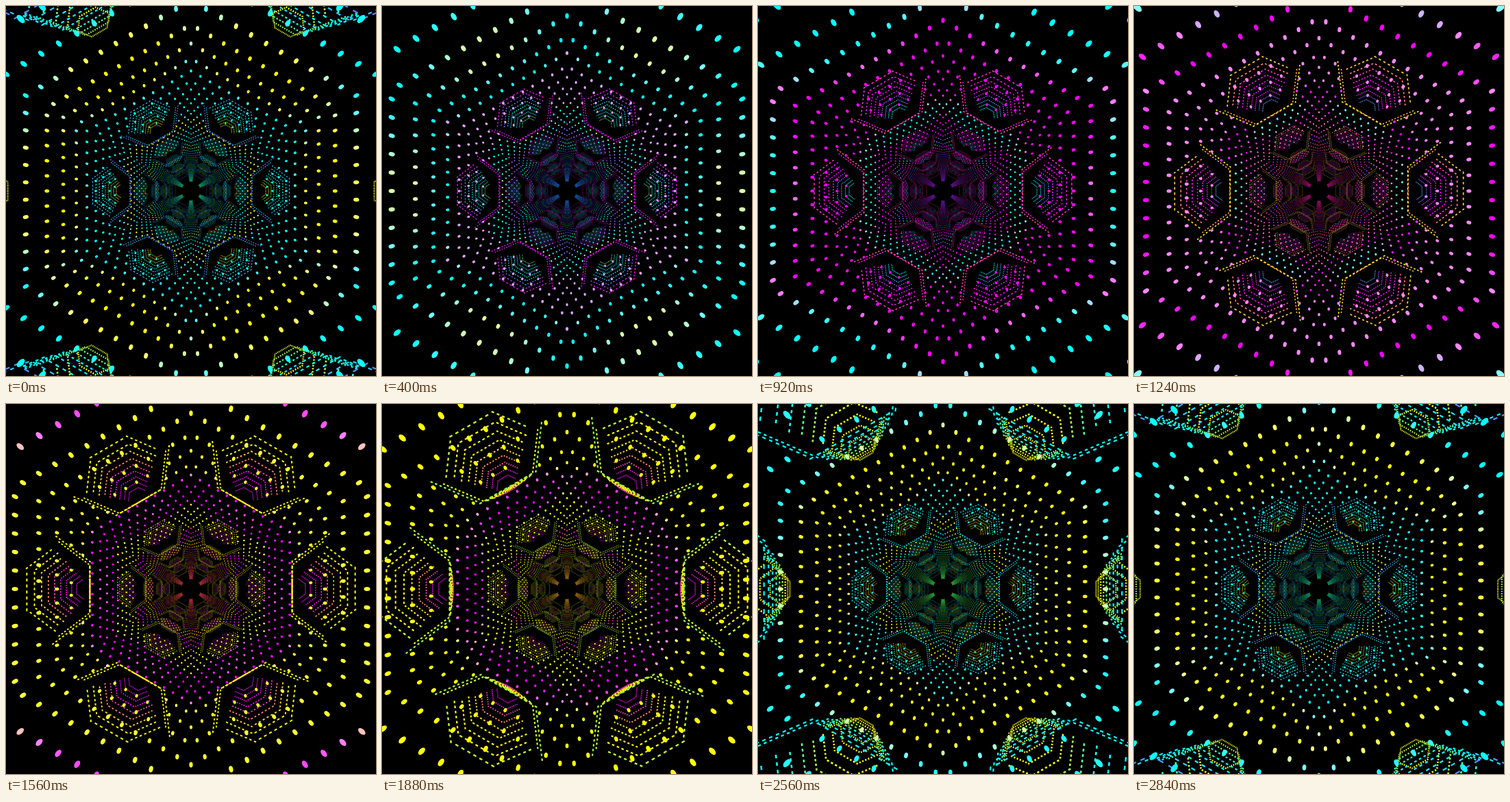
These frames come from a looping animation (540x540 px, 2880 ms). An HTML page with a canvas:

```html
<!DOCTYPE html>
<html lang="en">
<head>
<meta charset="utf-8">
<title>Hexagonal dot tunnel</title>
<style>
  html, body { margin: 0; width: 100%; height: 100%; overflow: hidden; background: #000; }
  canvas { display: block; width: 540px; height: 540px; }
</style>
</head>
<body>
<canvas id="stage" width="540" height="540"></canvas>
<script>
const ctx = document.getElementById('stage').getContext('2d');
const LOOP = 2880, STEP = 40, PERIOD = 10;   // PERIOD: rings between two sets of pods
const SCALE = 1640;                          // wall distance in px at a depth of one ring
const FOCAL = 230, TAU = Math.PI * 2;
const DOTS = 11, HALF_SIDE = 1 / Math.sqrt(3);
const POD = { x: .98, rim: .39, squash: .67, rings: 9 };
const POD_LEFT = POD.x - POD.squash * POD.rim;

const sectors = Array.from({ length: 6 }, (_, i) => [Math.cos(i * TAU / 6), Math.sin(i * TAU / 6)]);

// A high gain bleaches the primaries and keeps yellow, cyan and magenta pure.
function color(hue, gain, alpha = 1) {
  const channel = shift =>
    Math.round(255 * Math.min(1, gain * (1 + Math.cos((hue - shift) * TAU / 360))));
  return `rgba(${channel(0)},${channel(120)},${channel(240)},${alpha})`;
}

const bowlRadius = depth => .3 - .026 * (depth - .1) / .27;

// Half height of the pod mouth at a distance from the axis, both relative to the wall.
const mouth = x => x < POD_LEFT || x > 1 ? 0 : POD.rim / 2 + (x - POD_LEFT) * .747;

function hiddenByPod(n, y, rims) {
  return rims.some(rim => {
    if (rim >= n) return false;
    const ratio = rim / n, depth = n - rim;
    if (Math.abs(y) * ratio >= mouth(ratio)) return false;
    return !(depth < 2.3 && Math.abs(y) < bowlRadius(depth));
  });
}

function drawDot(x, y, r) {
  const rho = Math.hypot(x, y);
  if (r < .75) {
    ctx.fillRect(x - r, y - r, 2 * r, 2 * r);
    return;
  }
  ctx.beginPath();
  ctx.ellipse(x, y, r * Math.hypot(1, rho / FOCAL), r, Math.atan2(y, x), 0, TAU);
  ctx.fill();
}

function drawWall(n, odd, rims, rimHue) {
  const s = SCALE / n, r = Math.max(.5, 19.5 / n);
  const phase = (((n - rims[0]) % PERIOD) + PERIOD) % PERIOD;
  const q = Math.abs(phase - PERIOD / 2) / (PERIOD / 2);
  const gain = Math.max(.5, Math.min(1.5, 22 / n));
  for (let i = 0; i < DOTS; i++) {
    const w = -1 + 2 * (i + (odd ? .5 : 0)) / DOTS, y = w * HALF_SIDE;
    if (hiddenByPod(n, y, rims)) continue;
    const blend = Math.min(1, q * q * 2.6 + w * w * .45);
    ctx.fillStyle = color(rimHue - 175 + 135 * blend, gain, Math.min(1, 25 / n));
    for (const [c, d] of sectors) {
      const px = s * (c - y * d), py = s * (d + y * c);
      if (Math.abs(px) < 280 && Math.abs(py) < 280) drawDot(px, py, r);
    }
  }
}

// Collects dashes along half of a squashed hexagon; side is -1 (inner) or 1 (outer).
function halfRing(side, radius, count, offset, s, visible) {
  const k = side * POD.squash * radius;
  const corners = [[0, -radius], [k, -radius / 2], [k, radius / 2], [0, radius]];
  const dashes = [];
  for (let e = 0; e < 3; e++) {
    const [ax, ay] = corners[e], [bx, by] = corners[e + 1];
    const dx = (bx - ax) / count, dy = (by - ay) / count;
    for (let i = 0; i < count; i++) {
      const f = i + offset;
      const x = (POD.x + ax + dx * f) * s, y = (ay + dy * f) * s;
      if (visible(x, y)) dashes.push([x, y, dx * s * .24, dy * s * .24]);
    }
  }
  return dashes;
}

function strokeDashes(dashes, width, style) {
  ctx.strokeStyle = style;
  ctx.lineWidth = width;
  ctx.beginPath();
  for (const [c, d] of sectors) {
    for (const [x, y, dx, dy] of dashes) {
      const px = x * c - y * d, py = x * d + y * c;
      if (Math.abs(px) > 280 || Math.abs(py) > 280) continue;
      const ex = dx * c - dy * d, ey = dx * d + dy * c;
      ctx.moveTo(px - ex, py - ey);
      ctx.lineTo(px + ex, py + ey);
    }
  }
  ctx.stroke();
}

function drawPod(rim, rimHue) {
  const unit = SCALE / rim;
  const outsideMouth = (x, y) => Math.abs(y) / unit >= mouth(x / unit);
  const always = () => true;
  const alpha = Math.min(1, 22 / rim);
  for (let j = POD.rings - 1; j >= 0; j--) {
    const offset = j % 2 ? .5 : 0;
    const nIn = rim + .28 * j, nOut = rim + .1 + .27 * j;
    const width = Math.max(.7, 16 / nOut);
    const inner = halfRing(-1, POD.rim - .0375 * j, DOTS, offset, SCALE / nIn,
      j < 2 ? always : outsideMouth);
    const outer = halfRing(1, bowlRadius(nOut - rim), 7, offset, SCALE / nOut, always);
    strokeDashes(inner, Math.min(width, 2.2), color(rimHue - 18 * j, .9, alpha));
    strokeDashes(outer, Math.min(width, 2.6), color(rimHue - 10 - 19 * j, .95, alpha));
  }
}

function draw(t) {
  const travel = PERIOD * t, rimHue = 235 + 360 * t;
  const rims = [];
  for (let i = -1; i < 13; i++) {
    const rim = 13.4 + PERIOD * i - travel;
    if (rim > .6) rims.push(rim);
  }
  ctx.setTransform(1, 0, 0, 1, 0, 0);
  ctx.fillStyle = '#000';
  ctx.fillRect(0, 0, 540, 540);
  ctx.translate(270, 270);
  for (const rim of rims.filter(depth => depth < 55).reverse()) drawPod(rim, rimHue);
  for (let k = 130; k >= 3; k--) {
    const n = k + .8 - travel;
    if (n > 3.5) drawWall(n, k % 2, rims, rimHue);
  }
}

let shown = -1;
function tick() {
  const step = Math.floor((performance.now() % LOOP) / STEP);
  if (step !== shown) draw(step * STEP / LOOP);
  shown = step;
  requestAnimationFrame(tick);
}
tick();
</script>
</body>
</html>
```
